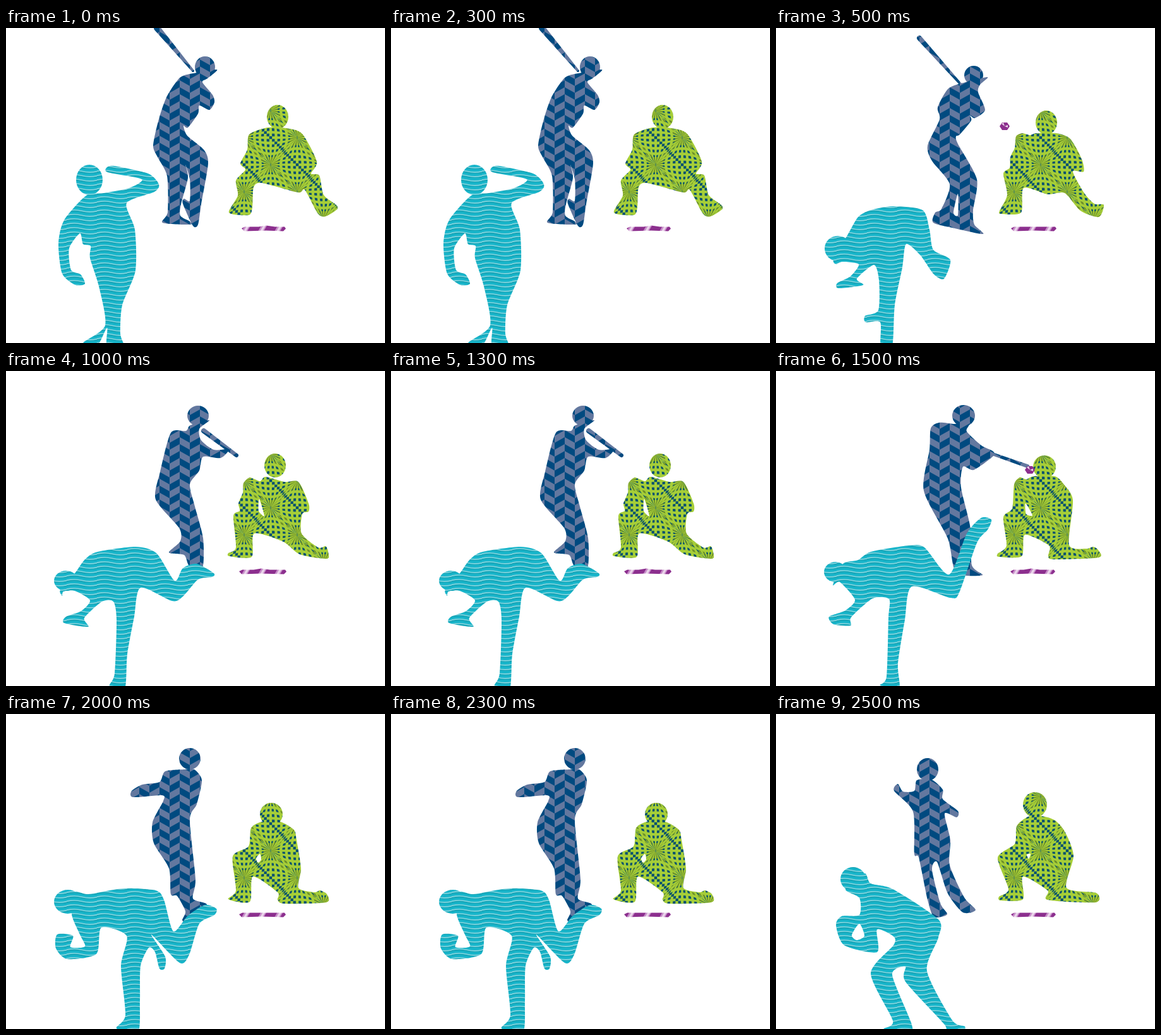
An HTML page for the animation above (3000 ms loop, 600 px wide and 500 px high).

```html
<!DOCTYPE html>
<html lang="en">
<head>
<meta charset="utf-8">
<title>Baseball loop</title>
<style>
  html, body { margin: 0; width: 100%; height: 100%; overflow: hidden; background: #fff; }
  svg { display: block; width: 600px; height: 500px; }
</style>
</head>
<body>
<svg id="stage" viewBox="0 0 600 500">
  <defs>
    <pattern id="chevron" patternUnits="userSpaceOnUse" x="243" y="6" width="32" height="22">
      <rect width="32" height="22" fill="#63789f"/>
    </pattern>
    <pattern id="bulge" patternUnits="userSpaceOnUse" x="419" y="217" width="84" height="86">
      <rect width="84" height="86" fill="#00506f"/>
    </pattern>
    <pattern id="waves" patternUnits="userSpaceOnUse" width="48" height="7">
      <rect width="48" height="7" fill="#17b5ca"/>
      <g fill="none" stroke-width="1.7">
        <path stroke="#14a3b5" d="M-1 5.3Q12 1.9 24 5.1T49 5.3"/>
        <path stroke="#86d3dc" d="M-1 3.5Q12 .1 24 3.3T49 3.5"/>
      </g>
    </pattern>
    <pattern id="stripes" patternUnits="userSpaceOnUse" width="26" height="10" patternTransform="translate(374 314) skewX(-30)">
      <rect width="26" height="10" fill="#8c2f8e"/>
      <rect x="4" width="9" height="10" fill="#c68bc8"/>
      <rect x="7" width="4" height="10" fill="#ead4ea"/>
    </pattern>
  </defs>
</svg>
<script>
const STEP = 500, COUNT = 6;
const stage = document.getElementById('stage');
const chevron = document.getElementById('chevron');
const bulge = document.getElementById('bulge');

function add(parent, tag, attrs) {
  const el = document.createElementNS('http://www.w3.org/2000/svg', tag);
  for (const key in attrs) el.setAttribute(key, attrs[key]);
  return parent.appendChild(el);
}

// Herringbone: slanted bars, swapped in every other column
for (const y of [-22, 0, 22]) {
  add(chevron, 'path', { fill: '#004a80', d: `M0 ${y}l16 9v11l-16 -9zM16 ${y + 20}l16 -9v11l-16 9z` });
}

// Tapered strips bowing between the pinch points of a warped grid
function strips(from, to, fill) {
  const a = from / .75, b = to / .75;
  let d = '';
  for (const [x, y] of [[0, 0], [84, 0], [42, -43], [42, 43]]) {
    d += `M${x} ${y}c${a} 26 ${a} 60 0 86c${b} -26 ${b} -60 0 -86z`;
  }
  for (const [x, y] of [[0, 0], [0, 86], [-42, 43], [42, 43]]) {
    d += `M${x} ${y}c26 ${a} 58 ${a} 84 0c-26 ${b} -58 ${b} -84 0z`;
  }
  add(bulge, 'path', { d, fill });
}
for (const side of [-1, 1]) strips(side * 31, side * 41, '#6d8f29');
for (let k = -3; k <= 3; k++) strips(k * 8.6 - 2.2, k * 8.6 + 2.2, '#a6ce38');

// Closed outline through "x,y" points with rounded bends; "|" starts a hole
function outline(text) {
  return text.split('|').map(part => {
    const p = part.trim().split(/\s+/).map(s => s.split(',').map(Number));
    const at = i => p[(i + p.length) % p.length];
    const lean = (i, s) => [0, 1].map(c => (at(i)[c] + s * (at(i + 1)[c] - at(i - 1)[c]) / 8).toFixed(1));
    return `M${p[0]}` + p.map((_, i) => `C${lean(i, 1)} ${lean(i + 1, -1)} ${at(i + 1)}`).join('') + 'Z';
  }).join('');
}

let pose, made = 0;

// Each pose shows for one step of the loop
function nextPose() {
  pose = add(stage, 'g', { opacity: 0 });
  const clip = pose.animate([
    { opacity: 1, easing: 'step-end' },
    { opacity: 0, offset: 1 / COUNT, easing: 'step-end' },
    { opacity: 0 }
  ], { duration: COUNT * STEP, delay: (made++ - COUNT) * STEP, iterations: Infinity });
  clip.startTime = 0;
}

function body(fill, cx, cy, rx, ry, points) {
  add(pose, 'ellipse', { cx, cy, rx, ry, fill: `url(#${fill})` });
  add(pose, 'path', { d: outline(points), fill: `url(#${fill})`, 'fill-rule': 'evenodd' });
}
const batter = (...args) => body('chevron', ...args);
const catcher = (...args) => body('bulge', ...args);
const pitcher = (...args) => body('waves', ...args);

function bat(x1, y1, x2, y2, w1, w2) {
  const len = Math.hypot(x2 - x1, y2 - y1);
  const nx = (y1 - y2) / len / 2, ny = (x2 - x1) / len / 2;
  add(pose, 'path', {
    fill: 'url(#chevron)',
    d: `M${x1 + nx * w1} ${y1 + ny * w1}A${w1 / 2} ${w1 / 2} 0 0 1 ${x1 - nx * w1} ${y1 - ny * w1}` +
       `L${x2 - nx * w2} ${y2 - ny * w2}A${w2 / 2} ${w2 / 2} 0 0 1 ${x2 + nx * w2} ${y2 + ny * w2}Z`
  });
}

function plate(left, right, peak, lift) {
  add(pose, 'path', {
    fill: 'url(#stripes)',
    d: `M${left} 318l5 -2.5H${peak - 12}L${peak} ${315.5 - lift}L${peak + 14} 315.5H${right - 2}l2 3l-4 4L${peak} 321.5L${left + 4} 322.5Z`
  });
}

function ball(x, y) {
  add(pose, 'path', { fill: '#8c2f8e', d: `M${x - 8} ${y}l4 -6h8l4 6l-4 6h-8z` });
  add(pose, 'path', { fill: '#ead4ea', d: `M${x} ${y}l-5 -4l3 -2zl5 -2v4z` });
}

nextPose();
plate(373, 443, 412, 2);
bat(239, 0, 296, 68, 10, 4);
batter(315, 62, 16, 17, '275,79 296,72 334,66 319,80 311,86 327,106 330,118 322,130 306,123 304,136 288,158 281,155 287,171 313,193 320,215 309,280 304,312 296,314 280,279 282,271 291,274 291,240 284,217 288,238 277,280 276,298 291,307 291,312 248,309 256,292 255,235 240,205 233,187 241,148 254,110');
catcher(430, 141, 17, 19, '414,158 444,159 469,168 492,212 483,231 496,234 503,265 523,281 524,288 506,299 494,295 473,257 462,261 405,246 392,253 390,285 384,297 353,293 367,266 364,242 379,225 371,215 382,193 385,169');
pitcher(132, 241, 21, 24, '127,266 155,262 195,254 215,240 161,229 160,221 172,219 225,231 242,248 235,260 191,278 204,320 205,385 184,440 181,485 186,505 160,505 160,476 144,505 122,500 157,472 147,410 133,365 134,346 122,343 117,326 100,350 103,384 118,391 125,406 110,408 89,390 83,342 92,305');

nextPose();
plate(372, 444, 410, 0);
bat(227, 16, 293, 90, 8, 4);
batter(313, 75, 15, 15, '273,96 300,86 335,78 323,90 320,102 331,130 315,143 307,139 309,147 291,169 285,172 288,184 318,240 312,290 314,312 328,327 283,318 249,309 252,293 262,287 275,248 247,211 240,187 259,145 256,126 | 288,263 288,297 281,293');
catcher(428, 150, 17, 19, '412,167 402,170 390,167 380,172 378,190 371,205 370,222 360,231 366,265 354,290 356,295 388,293 392,254 430,264 457,262 482,290 511,300 519,281 504,279 488,262 470,228 487,228 484,208 466,176 444,167');
ball(362, 156);
pitcher(98, 350, 21, 20, '113,329 130,300 150,289 185,283 232,289 243,320 249,352 276,368 266,398 250,391 228,360 206,343 200,380 188,440 184,505 166,505 165,467 142,467 141,457 162,448 163,400 155,376 128,398 138,408 99,413 97,405 118,394 131,375 105,371 95,375 91,366');

nextPose();
plate(369, 444, 404, 2);
bat(313, 95, 365, 134, 8, 6);
batter(304, 71, 17, 16, '261,98 285,95 292,86 322,78 306,92 309,110 329,125 353,124 340,138 312,136 306,158 291,180 299,215 312,265 311,313 290,309 282,292 258,288 276,270 274,249 237,204 244,160');
catcher(426, 150, 17, 19, '411,168 402,175 386,169 376,178 375,193 368,210 370,222 360,230 364,280 352,289 354,294 389,295 393,258 439,271 465,291 508,298 510,287 506,278 494,280 468,258 469,227 479,223 479,210 463,176 441,176 | 401,203 409,230 400,222');
pitcher(95, 333, 19, 16, '109,321 125,299 145,287 205,279 238,289 267,333 280,313 302,306 329,321 326,327 304,331 280,358 263,365 213,344 203,390 192,450 188,505 164,500 172,480 175,395 170,366 152,366 124,392 130,406 92,400 95,390 119,381 133,364 109,349 91,350 89,357 86,347');

nextPose();
plate(371, 442, 404, 2);
bat(338, 130, 398, 151, 5, 6);
batter(297, 71, 18, 17, '245,91 258,82 281,84 305,85 302,96 325,118 343,127 344,135 313,157 296,152 293,185 308,250 310,308 327,324 285,320 272,266 234,190 243,125');
catcher(425, 152, 18, 18, '408,167 396,172 386,169 377,180 374,218 360,232 365,277 351,290 353,295 389,294 394,260 432,277 431,294 440,299 511,296 510,284 502,279 491,282 464,276 470,205 455,179 441,167 | 395,210 406,229 396,227');
ball(402, 157);
pitcher(94, 319, 18, 16, '106,306 130,300 150,287 210,277 235,280 274,323 302,258 325,233 341,236 335,252 318,273 290,352 276,360 215,342 204,395 193,465 195,505 165,499 175,485 178,392 179,362 153,361 119,391 118,404 91,402 84,390 110,380 125,363 101,335 90,340');

nextPose();
plate(369, 443, 405, 0);
batter(291, 71, 17, 17, '252,91 282,88 298,88 310,105 302,143 291,168 300,262 296,293 318,303 286,329 279,327 284,313 271,289 261,286 258,245 234,205 232,172 249,138 247,129 201,132 199,122 216,112 243,108');
catcher(420, 159, 18, 18, '405,171 388,181 384,210 359,226 364,280 352,294 386,298 391,258 430,283 430,295 441,301 507,299 508,286 497,280 488,283 463,276 467,245 460,200 456,184 434,171 | 396,229 402,222 404,231 399,236');
pitcher(98, 298, 22, 19, '109,283 130,286 185,277 237,280 250,295 265,345 288,320 315,303 333,309 330,319 306,333 290,382 275,395 230,350 252,385 251,404 243,404 236,378 226,371 213,400 212,455 209,505 175,499 189,478 182,400 191,352 151,339 143,381 97,389 79,372 81,350 106,352 102,370 125,369 117,350 104,318');

nextPose();
plate(372, 443, 408, 0);
batter(240, 88, 17, 18, '223,105 246,104 264,120 264,135 288,154 286,164 267,158 276,200 275,240 298,291 316,311 296,315 272,285 255,235 247,247 260,300 271,318 250,322 240,295 226,228 219,222 217,155 187,122 193,111 201,123 219,122');
catcher(410, 144, 19, 20, '399,163 381,178 378,206 351,228 368,278 353,290 356,296 391,294 391,258 430,280 430,295 506,299 507,284 460,276 471,225 458,188 442,169 421,162 | 397,223 403,222 400,230');
pitcher(122, 262, 20, 19, '140,253 150,269 185,278 257,326 257,355 239,408 279,486 299,496 295,505 270,505 266,492 205,425 205,401 184,414 214,490 212,505 171,500 185,487 150,412 186,367 186,353 160,342 160,378 108,367 95,335 104,321 132,319 132,292 110,278 | 132,333 140,352 128,359 120,351');
</script>
</body>
</html>
```
